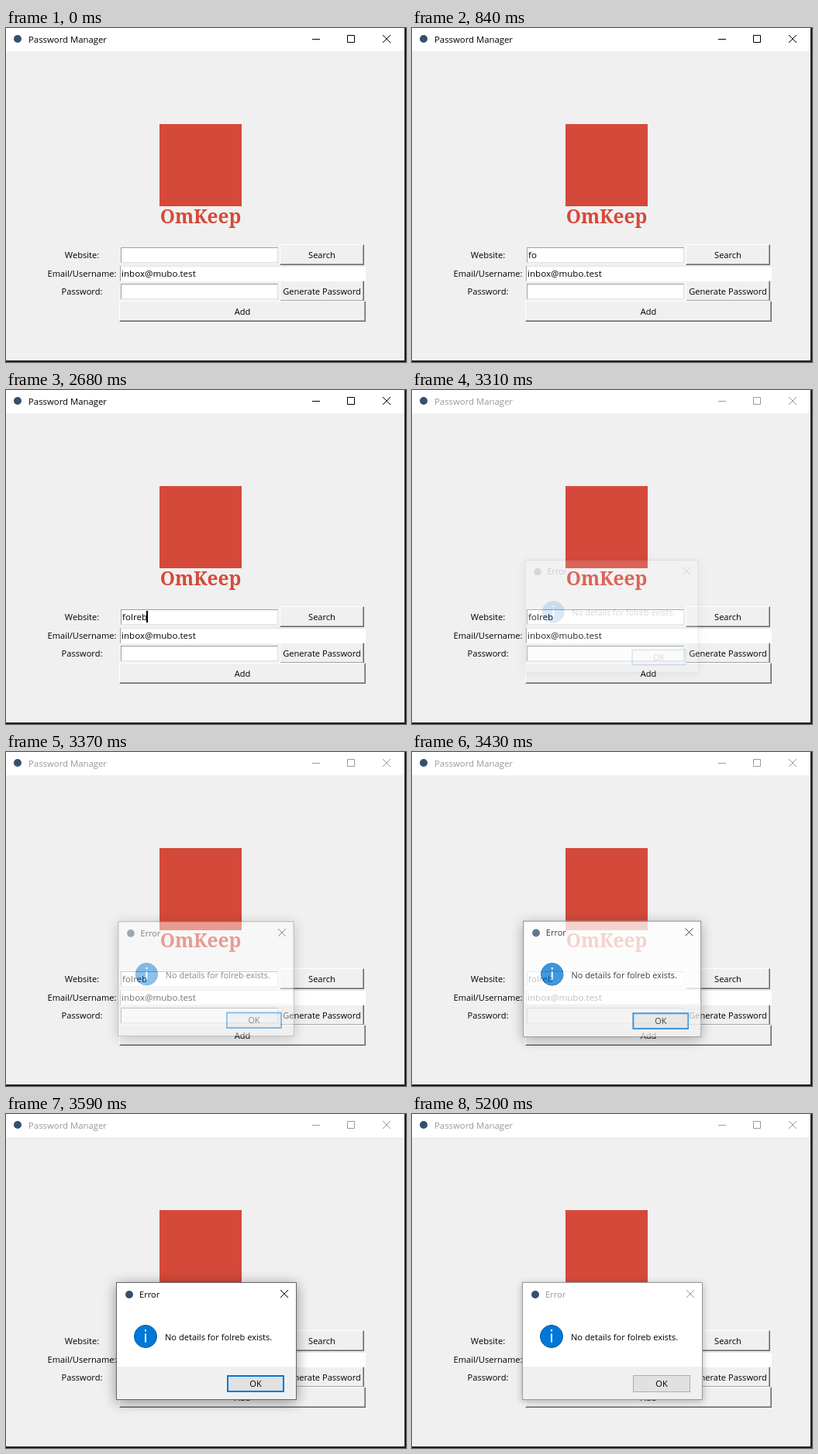
An HTML page that plays this animation: 516x431 px, repeating every 5270 ms.

```html
<!DOCTYPE html>
<html lang="en">
<head>
<meta charset="utf-8">
<title>Password Manager</title>
<style>
  html, body { margin: 0; width: 100%; height: 100%; overflow: hidden; background: #1f1f1f; }
  body { position: relative; font: 11.1px "Open Sans", "Noto Sans", sans-serif; color: #000; }
  div, svg { position: absolute; box-sizing: border-box; white-space: pre; }
  svg { fill: none; stroke: currentColor; left: 0; top: 0; }

  .window { left: 0; top: 0; width: 514px; height: 429px; background: #f0f0f0; }
  .titlebar { left: 0; top: 0; width: 514px; height: 30px; line-height: 29px; padding-left: 29px;
    font-size: 11.35px; background: #fff; }
  .badge { width: 10px; height: 10px; border-radius: 50%; background: #35506e; }

  .mark { left: 198px; top: 124px; width: 106px; height: 106px; background: #d5493a; }
  .wordmark { left: 171px; top: 227px; width: 160px; text-align: center;
    font: bold 24.500px/32px "Noto Serif", serif; color: #d5493a; }

  .label { left: 48px; width: 100px; line-height: 20px; text-align: center; }
  .entry { left: 148px; width: 203px; height: 20px; line-height: 18px; padding-left: 1px; font-size: 11.6px;
    background: #fff; border: 1px solid; border-color: #a0a0a0 #e3e3e3 #e3e3e3 #a0a0a0; }
  .entry.flat { left: 147px; width: 317px; border-color: #e3e3e3 #fff #fff #a0a0a0; }
  .button { left: 353px; width: 109px; height: 27px; line-height: 25px; text-align: center;
    background: #f0f0f0; border: 1px solid; border-color: #fff #696969 #696969 #fff;
    box-shadow: inset -1px -1px #a0a0a0; }
  .caret { position: absolute; top: 1px; width: 2px; height: 15px; margin-left: -1px; background: #000; }

  .dialog { left: 142px; top: 217px; width: 233px; height: 152px; background: #fff; border: 1px solid #666; }
  .caption { left: 29px; top: 0; width: 200px; line-height: 29px; }
  .message { left: 62px; top: 60px; line-height: 20px; }
  .footer { left: 0; top: 108px; width: 231px; height: 42px; background: #f0f0f0; }
  .ok { left: 142px; top: 11px; width: 74px; height: 22px; line-height: 22px; text-align: center; background: #e1e1e1; }
</style>
</head>
<body>
<div class="window">
  <div class="titlebar">Password Manager<div class="badge" style="left:10px;top:9px"></div>
    <svg width="514" height="30"><path d="M395 14.5h10M440.500 9.500h9v9h-9zM486 9l10 10m0-10l-10 10"/></svg>
  </div>

  <div class="mark"></div>
  <div class="wordmark">OmKeep</div>

  <div class="label" style="top:283px">Website:</div>
  <div class="label" style="top:307px">Email/Username:</div>
  <div class="label" style="top:330px">Password:</div>

  <div class="entry" id="website" style="top:283px"></div>
  <div class="entry flat" style="top:307px">inbox@mubo.test</div>
  <div class="entry" style="top:330px"></div>

  <div class="button" id="search" style="top:279px">Search</div>
  <div class="button" style="top:326px">Generate Password</div>
  <div class="button" style="left:146px;top:352px;width:318px">Add</div>
</div>

<div class="dialog">
  <div class="badge" style="left:11px;top:10px"></div>
  <div class="caption">Error</div>
  <svg class="close" width="231" height="30"><path d="M211 9l10 10m0-10l-10 10"/></svg>
  <svg width="60" height="90">
    <circle cx="37" cy="69" r="14.5" fill="#0078d7" stroke="#00569c"/>
    <path d="M37 65.500v11M37 60v2.500" stroke="#fff" stroke-width="2"/>
  </svg>
  <div class="message"></div>
  <div class="footer"><div class="ok">OK</div></div>
</div>

<script>
  const LOOP = 5270;
  const WORD = "folreb";
  const KEY_TIMES = [260, 840, 990, 1130, 1420, 1470];
  const BLINKS = [50, 630, 920, 1520, 1810, 2390, 2680, 3280];
  const PRESS = 3160, RELEASE = 3260, OPEN = 3280, OPAQUE = 3480, SETTLED = 3590, BLUR = 5200;

  const $ = selector => document.querySelector(selector);
  const play = (el, frames) => el.animate(frames, { duration: LOOP, iterations: Infinity });

  // Hard changes: each [ms, styles] holds until the next one.
  function hold(el, ...states) {
    const frames = states.map(([ms, styles]) => ({ offset: ms / LOOP, easing: "step-end", ...styles }));
    play(el, [...frames, { offset: 1, ...states.at(-1)[1] }]);
  }

  // One eased move between two times, still before and after.
  function ease(el, prop, from, to, start, end, easing) {
    play(el, [
      { offset: 0, [prop]: from },
      { offset: start / LOOP, [prop]: from, easing },
      { offset: end / LOOP, [prop]: to },
      { offset: 1, [prop]: to }
    ]);
  }

  const website = $("#website");
  [...WORD].forEach((letter, i) => {
    const span = document.createElement("span");
    span.textContent = letter;
    website.append(span);
    hold(span, [0, { fontSize: "0px" }], [KEY_TIMES[i], { fontSize: "11.6px" }]);
  });

  const caret = document.createElement("span");
  caret.className = "caret";
  website.append(caret);
  hold(caret, [0, { opacity: 0 }], ...BLINKS.map((ms, i) => [ms, { opacity: (i + 1) % 2 }]));

  const raised = { borderColor: "#fff #696969 #696969 #fff", boxShadow: "inset -1px -1px #a0a0a0", textIndent: "0px" };
  const sunken = { borderColor: "#696969 #fff #fff #696969", boxShadow: "inset 1px 1px #a0a0a0", textIndent: "2px" };
  hold($("#search"), [0, raised], [PRESS, sunken], [RELEASE, raised]);

  hold($(".titlebar"), [0, { color: "#000" }], [OPEN, { color: "#999" }]);

  const dialog = $(".dialog");
  $(".message").textContent = `No details for ${WORD} exists.`;
  ease(dialog, "opacity", 0, 1, OPEN, OPAQUE, "linear");
  ease(dialog, "transform", "translate(-1px, -1px) scale(.951)", "translate(0px, 0px) scale(1)",
    OPEN, SETTLED, "cubic-bezier(.333,.667,.667,1)");
  hold(dialog,
    [0, { borderColor: "#666", boxShadow: "0 3px 16px rgba(0,0,0,.4)" }],
    [BLUR, { borderColor: "#999", boxShadow: "0 2px 9px rgba(0,0,0,.28)" }]);
  for (const part of [$(".caption"), $(".close")]) {
    hold(part, [0, { color: "#000" }], [BLUR, { color: "#999" }]);
  }
  hold($(".ok"),
    [0, { boxShadow: "inset 0 0 0 2px #0078d7" }],
    [BLUR, { boxShadow: "inset 0 0 0 1px #adadad" }]);
</script>
</body>
</html>
```
